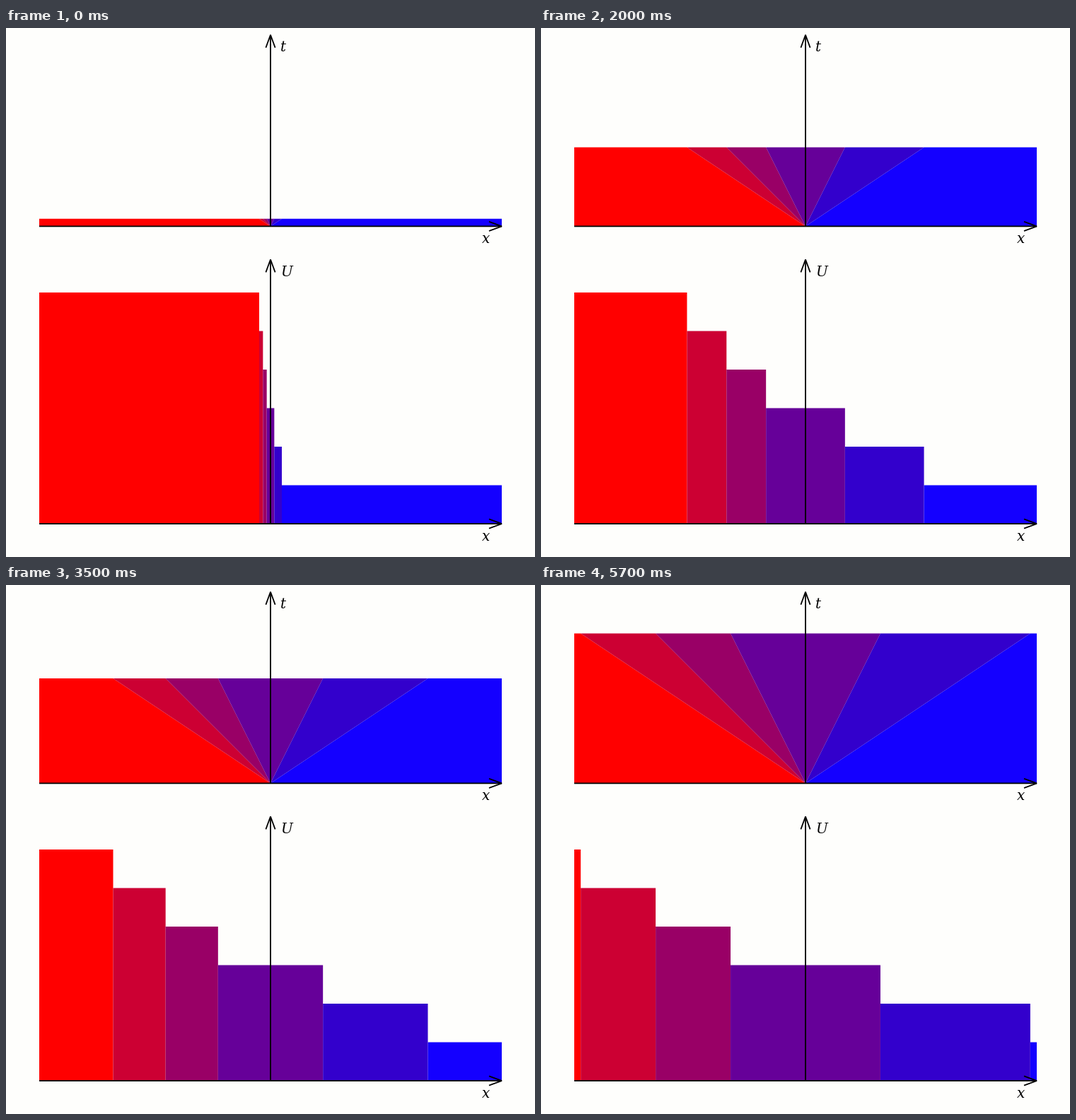
A matplotlib script that plays this animation: 748 by 748 pixels, repeating every 5.8 s.

```python
import numpy as np
import matplotlib.pyplot as plt
from matplotlib.animation import FuncAnimation
from matplotlib.patches import Polygon

SIZE, DPI = 748, 64
PX = 72 / DPI  # points per pixel
FRAMES, STEP = 58, 100

LEFT, MID, RIGHT = 47, 374, 701
BASE_T, BASE_U = 280.4, 701
UNIT = 54.5  # height of one level of U
SPEEDS = np.array([-1.5, -1, -0.5, 0.5, 1.5])
COLORS = ["#ff0000", "#cc0033", "#990066", "#660099", "#3300cc", "#1400ff"]

# Elapsed t (as pixels on the t axis) at key times in ms
KEY_MS = [0, 600, 1200, 1300, 1800, 2000, 2400, 3000,
          3600, 4000, 4200, 4800, 5400, 5700]
KEY_T = [10.67, 47, 80.9, 85, 105, 111.7, 120, 135,
         151, 167.4, 171, 184.2, 199, 211.9]

fig = plt.figure(figsize=(SIZE / DPI, SIZE / DPI), dpi=DPI, facecolor="#fefefc")
ax = fig.add_axes([0, 0, 1, 1])
ax.set_xlim(0, SIZE)
ax.set_ylim(SIZE, 0)
ax.axis("off")


def add_shape(color):
    shape = Polygon([(0, 0), (0, 0), (0, 0)], closed=True, facecolor=color,
                    edgecolor="none", linewidth=0, snap=False, zorder=1)
    return ax.add_patch(shape)


def stroke(points, **style):
    xs, ys = zip(*points)
    ax.plot(xs, ys, color="black", lw=1.8 * PX, snap=False, zorder=3,
            solid_capstyle="butt", solid_joinstyle="miter", **style)


def label(x, y, text):
    ax.text(x, y, text, family="DejaVu Serif", style="italic",
            size=20 * PX, ha="left", va="baseline", zorder=4)


def draw_axes(base, top, name):
    stroke([(LEFT, base), (RIGHT, base)])
    stroke([(MID, base), (MID, top)])
    stroke([(683, base - 6.6), (RIGHT, base), (683, base + 6.6)])
    stroke([(MID - 6.6, top + 18), (MID, top), (MID + 6.6, top + 18)])
    label(673, base + 23.6, "x")
    label(388, top + 23.2, name)


wedges = [add_shape(c) for c in COLORS]
bars = [add_shape(c) for c in COLORS]
draw_axes(BASE_T, 9.8, "t")
draw_axes(BASE_U, 327.4, "U")


def update(i):
    t = np.interp(i * STEP, KEY_MS, KEY_T)
    top = BASE_T - t
    edges = [LEFT, *(MID + SPEEDS * t), RIGHT]
    for k, (x0, x1) in enumerate(zip(edges, edges[1:])):
        points = [(MID, BASE_T), (x0, top), (x1, top)]
        if k == 0:
            points.insert(1, (LEFT, BASE_T))
        elif k == len(COLORS) - 1:
            points.append((RIGHT, BASE_T))
        wedges[k].set_xy(points)
        y = BASE_U - (len(COLORS) - k) * UNIT
        bars[k].set_xy([(x0, BASE_U), (x0, y), (x1, y), (x1, BASE_U)])
    return wedges + bars


anim = FuncAnimation(fig, update, frames=FRAMES, interval=STEP,
                     repeat=True, repeat_delay=0, blit=False)
plt.show()
```
